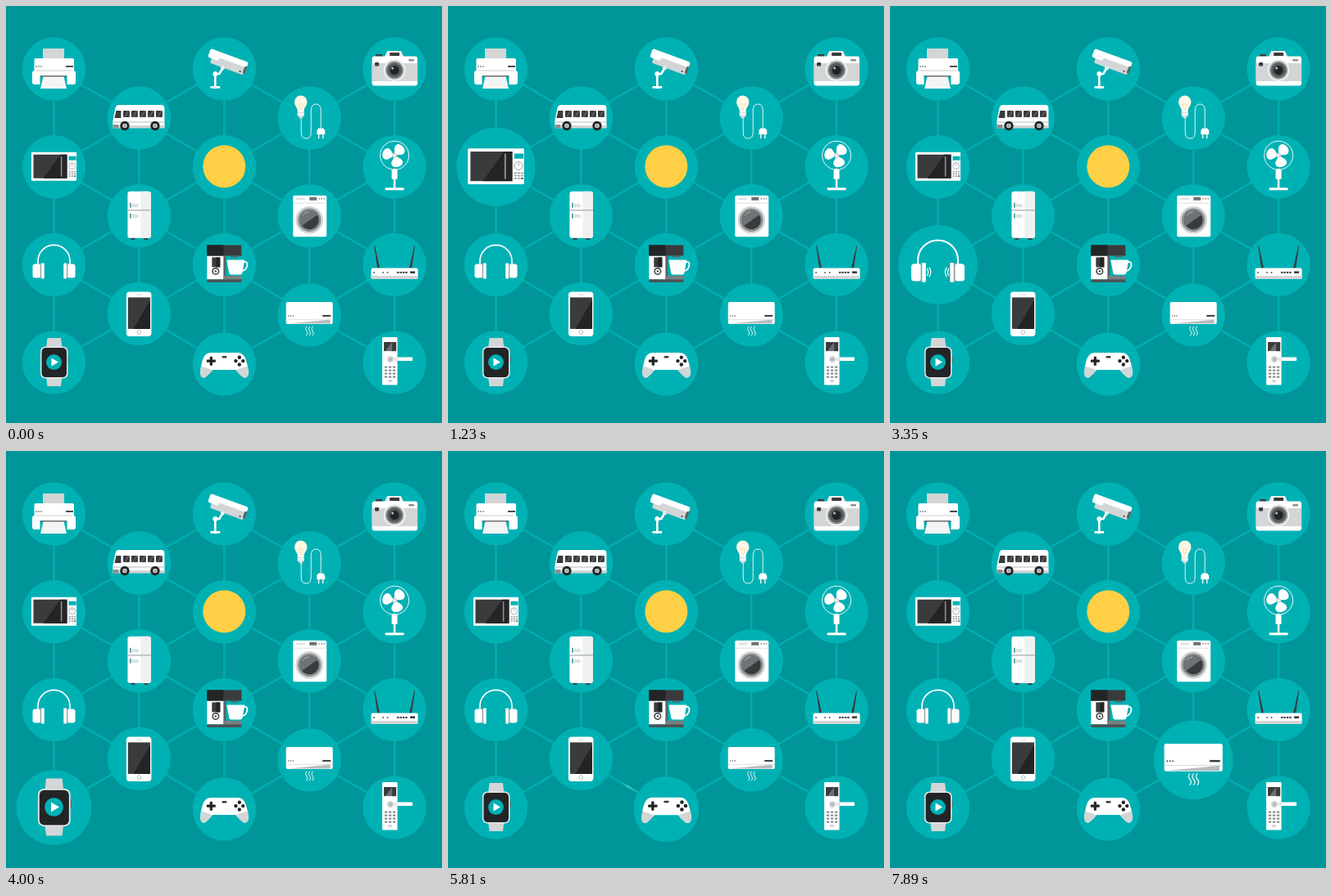
An HTML page for the animation above (8000 ms loop, 532x510 px).

```html
<!DOCTYPE html>
<html lang="en">
<head>
<meta charset="utf-8">
<title>Connected devices</title>
<style>
html, body { margin: 0; width: 100%; height: 100%; overflow: hidden; background: #009598; }
svg { display: block; width: 100vw; height: 100vh; }
</style>
</head>
<body>
<svg id="stage" viewBox="0 0 532 510" xmlns="http://www.w3.org/2000/svg"></svg>
<script>
const LOOP = 8000, R = 38.7, GROW = 0.25;
const DISC = '#00b1b4', LINE = '#00aeb1', DARK = '#3a3b3d', BLACK = '#232425', GREY = '#d3d5d6', MID = '#8b8f91', W = '#fff';

const rect = (x, y, w, h, f = W, r = 0, more = '') =>
  `<rect x="${x}" y="${y}" width="${w}" height="${h}" fill="${f}" rx="${r}" ${more}/>`;
const circ = (x, y, r, f = W, more = '') => `<circle cx="${x}" cy="${y}" r="${r}" fill="${f}" ${more}/>`;
const path = (d, f = W, more = '') => `<path d="${d}" fill="${f}" ${more}/>`;
const stroke = (d, s = W, w = 1, more = '') =>
  `<path d="${d}" fill="none" stroke="${s}" stroke-width="${w}" stroke-linecap="round" ${more}/>`;
const row = (n, fn) => Array.from({ length: n }, (_, i) => fn(i)).join('');
const group = (id, body, more = '') => `<g id="${id}" ${more}>${body}</g>`;

// Icons are drawn around the centre of their disc.
const icons = {
  printer: () =>
    rect(-13.5, -25, 26, 17, GREY) +
    rect(-24, -13, 48.5, 19, W, 2) + rect(-26.5, 2, 53, 17, W, 3) +
    rect(-22, 1.5, 44, 1, '#c9cdce') + path('M-17 9H16V19H-17Z', DISC) +
    row(3, i => circ(-21.5 + i * 3, -3, 0.8, DARK)) + rect(14.5, -4, 9, 1.8, DARK) +
    path('M-13 9H12L15.5 24H-16.5Z', '#f3f4f4') + rect(-17, 8, 33, 1.5, '#6c7173'),

  bus: () =>
    group('busBody',
      path('M-25 -16H27Q31 -16 31 -12V12H-32V3L-29 -12Q-28 -16 -25 -16Z') +
      rect(-32, 4, 63, 2, '#d9dddd') + rect(-32, 9, 63, 3.5, GREY) + rect(-32, 8, 7, 4.5, MID, 1) +
      path('M-28 -9H-22V0H-30Z', DARK) +
      row(5, i => rect(-19.5 + i * 10, -9, 8, 8, DARK, 1)) +
      row(5, i => path(`M${-18 + i * 10} -1L${-14 + i * 10} -9h2L${-16 + i * 10} -1Z`, '#585d60'))) +
    [-17.5, 19.5].map(x => circ(x, 9.5, 5.7, BLACK) + circ(x, 9.5, 2.8, '#dfe3e3') +
      `<g transform="translate(${x} 9.5)"><path class="wheel" d="M-2.5 0H2.5M0 -2.5V2.5" stroke="${MID}"/></g>`).join(''),

  cctv: () =>
    stroke('M-2 -1L-6 6H-11V23', W, 2.6) + circ(-11, 6, 3) + rect(-17, 21, 12, 2.8, W, 1) +
    `<g transform="translate(4 -8) rotate(20)">${
      rect(-20, -4, 43, 12, GREY, 2) + rect(-25, -9, 49, 7, W, 2.5) + rect(-25, -5, 14, 7, W, 2.5) +
      rect(21.5, -3, 3, 9, '#5c6163', 1.5) + circ(18, 5, 1, DARK)}</g>` +
    circ(-2, -1, 2.5, '#eceeee'),

  camera: () =>
    path('M-12 -15L-9 -22H8L11 -15Z', '#eceeee') + rect(-23, -18, 8, 4, DARK, 1) +
    rect(-27.5, -15.5, 55.5, 36, W, 3) + rect(-27.5, -7, 55.5, 22, GREY) +
    rect(-6, -20, 12, 4, DARK, 1) + rect(-24, -8, 5, 4.5, DARK, 1) + rect(17, -12, 7, 2.5, MID, 1) +
    circ(0, 1.5, 13.5, '#eceeee') + circ(0, 1.5, 11, MID) + circ(0, 1.5, 9, '#55595b') + circ(0, 1.5, 5.5, BLACK) +
    circ(-2.5, -1, 1.5, '#b9bfc1'),

  bulb: () =>
    stroke('M-10 0V18Q-10 25 -4 25Q2 25 2 18V-9Q2 -17 8 -17Q14 -17 14 -9V12', '#e2f7f7', 1) +
    path('M-10.5 -27.5A7.7 7.7 0 0 1 -2.8 -19.8C-2.8 -15 -6.5 -13 -6.5 -9H-14.5C-14.5 -13 -18.2 -15 -18.2 -19.8A7.7 7.7 0 0 1 -10.5 -27.5Z', '#fff8e6') +
    stroke('M-13 -17L-11 -10M-8 -17L-10 -10M-13 -17H-8', '#eed9a4', 0.7) +
    rect(-14.5, -9, 8, 7, W, 1) + row(2, i => rect(-14.5, -7 + i * 3, 8, 0.8, '#c5cacb')) + rect(-12.7, -2, 4.5, 2.5, GREY, 1) +
    path('M11 12.5H17L19 15.5V20H9V15.5Z') + rect(10.8, 20, 1.3, 5) + rect(15.9, 20, 1.3, 5),

  microwave: () =>
    rect(-27.5, -18, 55, 35, W, 1) + rect(-25, -15, 41, 29, DARK) +
    path('M-13 14L8 -15H16V14Z', BLACK) + rect(8.3, -13, 1.6, 25, MID, 0.8) +
    rect(18, -13, 9, 5, DISC) + circ(22.2, -1, 4, W, `stroke="${MID}" stroke-width=".7"`) +
    stroke('M22.2 -1V-3.5', MID, 0.7) +
    row(9, i => rect(18 + i % 3 * 3.2, 5.5 + (i / 3 | 0) * 2.6, 2.2, 1.3, i === 8 ? DARK : MID)),

  hub: () => circ(0, -0.5, 26, '#ffd045'),

  fan: () =>
    circ(0, -14, 17.5, 'none', 'stroke="#e9fbfb" stroke-width="1"') +
    rect(-1.3, 2, 2.6, 25, '#eceeee') + rect(-3.5, 3, 7, 12, W, 1) + rect(-11.5, 25.5, 23, 3, W, 1) +
    [35, 155, 275].map(a =>
      path('M0 0C-3 -5 -8 -8 -5 -13C-1 -17 8 -14 8 -9C8 -5 3 -4 0 0Z', W, `transform="translate(0 -14) rotate(${a})"`)).join('') +
    circ(0, -14, 3, GREY) + circ(0, -14, 1.3, W),

  fridge: () =>
    rect(-10, 25, 5, 4, DARK) + rect(6, 25, 5, 4, DARK) +
    rect(-14, -30, 28.5, 57, W, 3) + path('M2 -30H11.5Q14.5 -30 14.5 -27V24Q14.5 27 11.5 27H2Z', '#eff0f0') +
    rect(-14, -7.5, 28.5, 1.2, '#a4abad') +
    rect(-11.2, -16, 1.4, 6, '#26898f') + rect(-11.2, -3, 1.4, 6, '#26898f') +
    row(3, i => rect(-8.3 + i * 2.8, -14, 1.8, 2.8, 'none', 0, `stroke="#b3bcbe" stroke-width=".6" ${i ? '' : 'id="digit"'}`)) +
    row(3, i => rect(-8.3 + i * 2.8, -1, 1.8, 2.8, 'none', 0, 'stroke="#b3bcbe" stroke-width=".6"')),

  washer: () =>
    rect(-20, -25, 41, 50.5, W, 2) + rect(-20, -16, 41, 0.8, GREY) +
    rect(-16, -22, 11, 2.5, '#dde1e1') + rect(0, -23, 9, 4, '#6c7173') + row(3, i => circ(12 + i * 3, -21, 0.9, MID)) +
    circ(0, 5, 16.8, GREY) + circ(0, 5, 14.2, MID) + circ(0, 5, 11.5, DARK) +
    path('M-9 12A11.5 11.5 0 0 1 5 -5.4L9.5 -1.3Z', '#6e7375') +
    stroke('M-8 -1A10.5 10.5 0 0 1 -1 -5', '#b4babc', 1),

  headphones: () =>
    stroke('M-19.5 1V-4.5A19.5 19.5 0 0 1 19.5 -4.5V1', W, 1.6) +
    [1, -1].map(s => `<g transform="scale(${s} 1)">${
      rect(-26, -1, 10, 17, W, 3) + rect(-16.8, -2, 1.4, 19, '#9a9fa1') + rect(-15.4, -2, 3.6, 19, W, 1) +
      stroke('M-10.5 4Q-8.5 7.3 -10.5 10.5', W, 1, 'class="waveA"') +
      stroke('M-8.3 3Q-5.8 7.3 -8.3 11.5', W, 1, 'class="waveB"')}</g>`).join(''),

  coffee: () =>
    rect(-1, -12, 3, 27, '#5c6163') + rect(-21, -11, 20, 29) +
    rect(-21, -24, 42, 13, DARK) + rect(-21, -24, 20, 13, BLACK) + rect(8, -11, 9, 2, '#5c6163') +
    rect(-15, -9, 10, 12, DARK) + rect(-10, -9, 5, 12, BLACK) +
    circ(-10.5, 8, 4.5, DARK) + circ(-10.5, 8, 3, W) + circ(-10.5, 8, 1.2, DARK) +
    rect(-1, 13.5, 22, 5, '#7a7f81') + rect(-21, 18, 42, 3.5, '#4d5153') +
    stroke('M23 -3Q29 -5 28 1Q27 7 21 8', W, 1.8) + path('M3 -6H25L22 10Q21.5 12 19.5 12H8.5Q6.5 12 6 10Z') +
    rect(7, 10, 14, 0, '#e6f2f2', 1, 'id="level"') + rect(13, -8.5, 2, 0, '#8fd3d4', 0, 'id="pour"'),

  router: () =>
    [1, -1].map(s => path('M-25 -23H-24L-18 4H-21Z', DARK, `transform="scale(${s} 1)"`)).join('') +
    rect(-28.5, 4, 57, 13.5, W, 2) + rect(-28.5, 13.5, 57, 4, GREY, 1.5) +
    [-25, -14, -8.5].map(x => circ(x, 9.5, 0.9, DARK)).join('') + row(4, i => rect(3 + i * 3.4, 8.5, 2.4, 2, DARK)) + rect(19, 8, 6, 2.6, DARK),

  phone: () =>
    rect(-15.5, -27, 30.5, 54.5, W, 4) + rect(-13.5, -20, 27, 38.5, DARK) + path('M-7 18.5L13.5 -17V18.5Z', BLACK) +
    rect(-3.5, -24, 7, 1.2, GREY, 0.6) + circ(0, 22.7, 2.3, W, `stroke="${MID}" stroke-width=".6"`),

  aircon: () =>
    rect(-28.5, -16, 57, 27, W, 2) + path('M-25.5 10.5L25.5 5.5V10.5Z', '#b7bdbf') + rect(-28.5, 5, 57, 0.7, GREY) +
    rect(16, 0, 10, 2, DARK) + row(3, i => circ(-25.5 + i * 2.7, 1, 0.7, DARK)) +
    group('steam', row(3, i => stroke(`M${-3.5 + i * 3.7} 14q-2.6 2.8 0 5.5t0 5.5`, '#e4f8f8', 1))),

  watch: () =>
    path('M-9.5 -17L-8 -30H8.5L10 -17Z', GREY) + path('M-9.5 17L-8 29H8.5L10 17Z', GREY) +
    rect(16, -8, 2, 8, '#5c6163', 1) + rect(-16.5, -19.5, 33.5, 39, '#e6e8e8', 6) + rect(-15, -18, 30.5, 36, BLACK, 5) +
    circ(0, -0.5, 9.5, DISC) + path('M-3 -5.5L5.5 -0.5L-3 4.5Z'),

  gamepad: () => {
    const body = 'M-16 -14H16Q24 -14 26.5 -5Q30 6 29.5 12Q28 18 23 16Q18 12 14 7H-14Q-18 12 -23 16Q-28 18 -29 12Q-29.5 6 -26.5 -5Q-24 -14 -16 -14Z';
    return `<clipPath id="pad"><path d="${body}"/></clipPath>` + path(body) +
      `<g clip-path="url(#pad)">${[1, -1].map(s => path('M30 2Q21 4 13 8V20H30Z', GREY, `transform="scale(${s} 1)"`)).join('')}</g>` +
      rect(-21.5, -5.5, 11, 3.2, BLACK, 0.8) + rect(-17.6, -9.4, 3.2, 11, BLACK, 0.8) +
      [[0, -4.4], [4.4, 0], [0, 4.4], [-4.4, 0]].map(([x, y]) => circ(18.5 + x, -4 + y, 2.2, BLACK)).join('') +
      rect(-2.7, -10, 5.7, 2.5, DARK, 0.6, 'id="lamp"');
  },

  lock: () =>
    rect(-15, -31, 18.5, 58.5, W, 1) + rect(-13, -25, 15, 11, '#6c7173') + path('M-13 -25H-3L-11 -14H-13Z', DARK) + rect(-3, -25, 5, 11, DARK) +
    circ(-5, -4, 4.2, GREY) + circ(-5, -4, 2.2, '#b3b8ba') + rect(0, -6.5, 22, 4.5, W, 1) + circ(2, -4.3, 2.6, '#e4e8e8') +
    row(12, i => rect(-12.2 + i % 3 * 5, 4.3 + (i / 3 | 0) * 4, 3.4, 2.3, MID, 0.6)) +
    rect(-8, 21, 5, 3, GREY, 0.7)
};

const columns = [
  ['printer', 'microwave', 'headphones', 'watch'],
  ['bus', 'fridge', 'phone'],
  ['cctv', 'hub', 'coffee', 'gamepad'],
  ['bulb', 'washer', 'aircon'],
  ['camera', 'fan', 'router', 'lock']
];
const lower = { gamepad: 2, aircon: 1.5 };
const nodes = {};
columns.forEach((names, c) => names.forEach((name, i) => {
  nodes[name] = { x: 58.5 + c * 103.9, y: (c % 2 ? 137 : 77) + i * 119.7 + (lower[name] || 0) };
}));

// Link every pair of neighbouring discs.
const all = Object.values(nodes);
let net = '';
all.forEach((a, i) => all.slice(i + 1).forEach(b => {
  if (Math.hypot(a.x - b.x, a.y - b.y) < 125) net += `M${a.x} ${a.y}L${b.x} ${b.y}`;
}));

const $ = id => document.getElementById(id);
$('stage').innerHTML =
  `<defs><linearGradient id="glow"><stop offset="0" stop-color="#8ff3f5" stop-opacity=".5"/>
  <stop offset=".35" stop-color="#d9ffff"/><stop offset="1" stop-color="#8ff3f5" stop-opacity=".6"/></linearGradient></defs>` +
  rect(0, 0, 532, 510, '#009598') + stroke(net, LINE, 2.4) +
  Object.keys(nodes).map(n => group(n, circ(0, 0, R, DISC) + icons[n]())).join('') +
  path('', 'url(#glow)', 'id="spark"');

// The signal hops along this route; each hop leaves at its start time.
const route = ['printer', 'bus', 'microwave', 'fridge', 'headphones', 'watch', 'phone', 'gamepad', 'coffee', 'aircon'];
const starts = [-140, 760, 1686, 2632, 3578, 4524, 5470, 6416, 7385];
const SHRINK = 200, ARRIVE = 300, RISE = 185;

const clamp = v => Math.max(0, Math.min(1, v));
const ease = v => { v = clamp(v); return v * v * (3 - 2 * v); };
const show = (list, on) => list.forEach(el => el.setAttribute('opacity', on ? 1 : 0));
const wavesA = document.querySelectorAll('.waveA'), wavesB = document.querySelectorAll('.waveB');
const wheels = document.querySelectorAll('.wheel');

function drawSpark(t) {
  const k = starts.findIndex(s => t >= s + SHRINK && t < s + 370);
  $('spark').setAttribute('opacity', 0);
  if (k < 0) return;
  const u = t - starts[k], a = nodes[route[k]], b = nodes[route[k + 1]];
  const head = Math.min(86, 50 + (u - 216) * 0.27), tail = Math.max(35, head - 27), wide = tail + (head - tail) * 0.35;
  const turn = Math.atan2(b.y - a.y, b.x - a.x) * 180 / Math.PI;
  $('spark').setAttribute('d', `M${tail} 0L${wide} -1.5L${head} 0L${wide} 1.5Z`);
  $('spark').setAttribute('transform', `translate(${a.x} ${a.y}) rotate(${turn})`);
  $('spark').setAttribute('opacity', 1 - clamp((u - 260) / 110));
}

function draw(t) {
  for (const name in nodes) {
    const k = route.indexOf(name), { x, y } = nodes[name];
    let size = 0;
    if (k > 0) {
      size = ease((t - starts[k - 1] - ARRIVE) / RISE);
      if (k < starts.length) size *= 1 - ease((t - starts[k]) / SHRINK);
    }
    $(name).setAttribute('transform', `translate(${x} ${y}) scale(${1 + GROW * size})`);
  }
  drawSpark(t);

  const drive = clamp((t - 160) / 600);
  $('busBody').setAttribute('transform', `translate(0 ${-0.5 * Math.abs(Math.sin(drive * Math.PI * 5))})`);
  wheels.forEach(w => w.setAttribute('transform', `rotate(${-720 * drive})`));

  $('digit').setAttribute('stroke', t >= 2380 && t < 2610 ? '#26898f' : '#b3bcbe');
  show(wavesA, t >= 3130 && t < 3580);
  show(wavesB, t >= 3320 && t < 3580);
  $('lamp').setAttribute('fill', t >= 6130 && t < 6330 ? DISC : DARK);

  const pouring = t > 6880 && t < 7385, fill = pouring ? clamp((t - 6920) / 420) * 10 : 0;
  $('pour').setAttribute('height', pouring ? clamp((t - 6880) / 50) * (18 - fill) : 0);
  $('level').setAttribute('height', fill);
  $('level').setAttribute('y', 10.5 - fill);
  $('steam').setAttribute('transform', `translate(0 ${-0.6 * ease((t - 7685) / 200)})`);
}

function tick() {
  draw(performance.now() % LOOP);
  requestAnimationFrame(tick);
}
tick();
</script>
</body>
</html>
```
